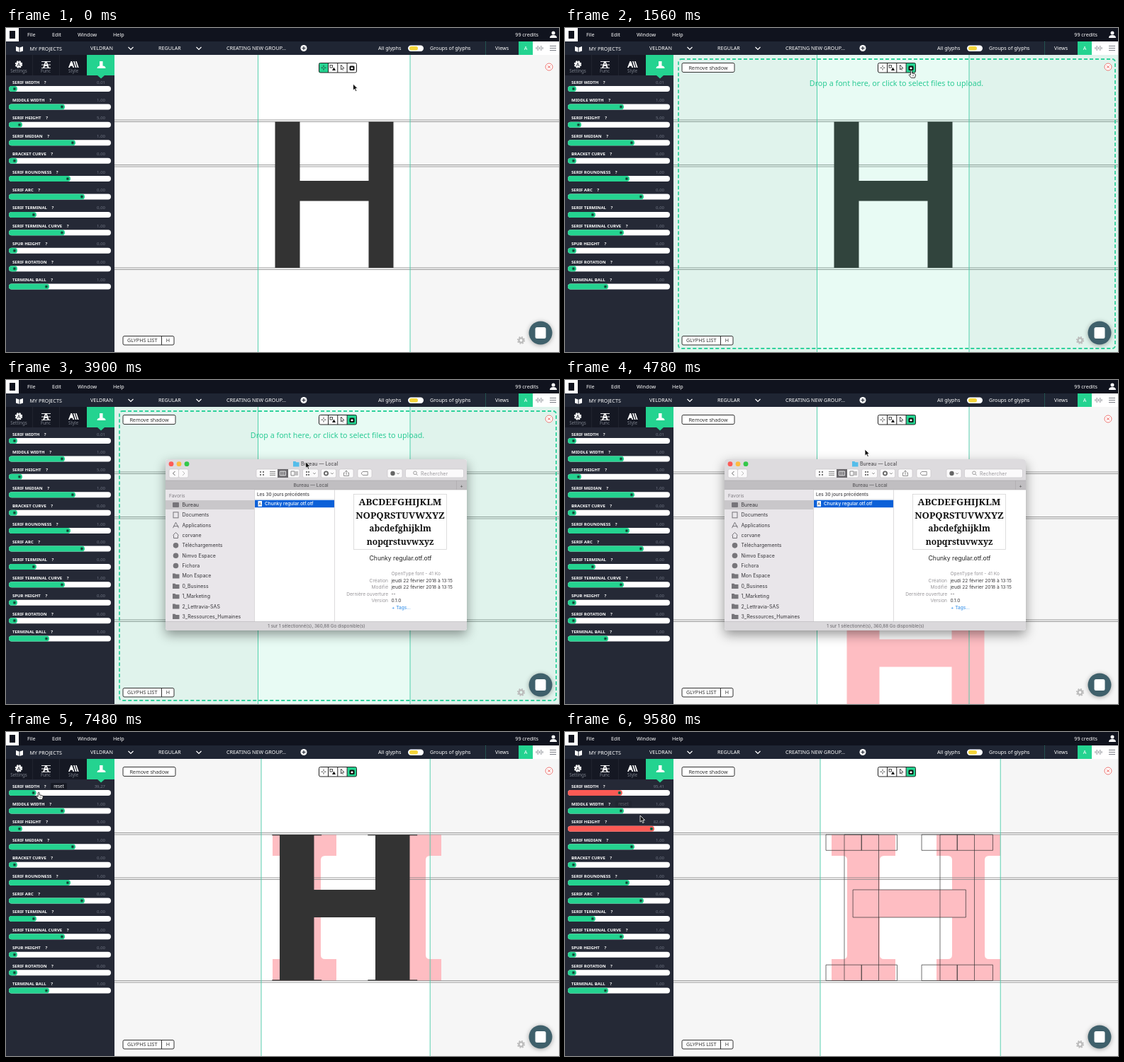
Write an HTML page that moves like this. It is 780 by 458 pixels and loops after 9600 ms.

```html
<!DOCTYPE html>
<html lang="en">
<head>
<meta charset="utf-8">
<title>Glyph editor</title>
<style>
html, body { margin: 0; width: 100%; height: 100%; overflow: hidden; background: #f6f6f6 }
svg { display: block; width: 780px; height: 458px }
text { font: 7.2px "Noto Sans", "Open Sans", sans-serif; white-space: pre }
.label { font-size: 6px; font-weight: 600 }
.finder text { font: 7px Inter, Roboto, sans-serif }
.finder .slab { font: 900 13.2px "Noto Serif", serif }
.finder .slab.low { font-size: 12px }
#finder { filter: drop-shadow(0 6px 8px #0006) }
</style>
</head>
<body>
<svg id="stage" viewBox="0 0 780 458"></svg>
<script>
const LOOP = 9600, GREEN = '#24d390', DARK = '#333';
const box = (x, y, w, h, fill, more = '') =>
  `<rect x="${x}" y="${y}" width="${w}" height="${h}" fill="${fill}" ${more}/>`;
const disc = (x, y, r, fill, more = '') =>
  `<circle cx="${x}" cy="${y}" r="${r}" fill="${fill}" ${more}/>`;
const line = (d, stroke, width = 1, more = '') =>
  `<path d="${d}" fill="none" stroke="${stroke}" stroke-width="${width}" ${more}/>`;
const shape = (d, fill, more = '') => `<path d="${d}" fill="${fill}" ${more}/>`;
const text = (x, y, s, fill = '#fff', more = '') =>
  `<text x="${x}" y="${y}" fill="${fill}" ${more}>${s}</text>`;
const group = (id, body, more = '') => `<g id="${id}" ${more}>${body}</g>`;
const middle = 'text-anchor="middle"', end = 'text-anchor="end"';

// Sliders: name, shown value, knob position
const SLIDERS = [
  ['SERIF WIDTH', '0,01', 12], ['MIDDLE WIDTH', '1,00', 79], ['SERIF HEIGHT', '5,00', 19],
  ['SERIF MEDIAN', '1,00', 94], ['BRACKET CURVE', '0,00', 12], ['SERIF ROUNDNESS', '1,00', 87],
  ['SERIF ARC', '0,00', 107], ['SERIF TERMINAL', '0,00', 39], ['SERIF TERMINAL CURVE', '1,00', 79],
  ['SPUR HEIGHT', '0,00', 12], ['SERIF ROTATION', '0,00', 12], ['TERMINAL BALL', '1,00', 57]
];
const rowY = i => 86 + i * 25.42;

function slider([name, value, knob], i) {
  const y = rowY(i);
  return text(9, y - 7.5, `${name}<tspan dx="6.5">?</tspan>`, '#fff', 'class="label"') +
    text(140, y - 7.5, value, '#717684', `id="value${i}" ${end} style="font-size:6px"`) +
    box(4, y - 4, 144, 8, '#fff', 'rx="4"') +
    box(4, y - 4, knob, 8, GREEN, `id="fill${i}" rx="4"`) +
    `<g id="knob${i}" transform="translate(${knob} ${y})">` +
    disc(0, 0, 2.2, '#167a58') + shape('M-.8 -1.4L1.3 0L-.8 1.4Z', '#11251f') + '</g>';
}

function header() {
  const menus = [[30, 'File'], [65, 'Edit'], [101, 'Window'], [151, 'Help']];
  const chevron = x => line(`M${x - 3.5} 27l3.5 3.5l3.5-3.5`, '#fff', 1.2);
  return box(0, 0, 780, 19, '#10131e') + box(0, 0, 18, 19, '#fff') + box(5, 4, 8, 11, '#10131e') +
    menus.map(([x, s]) => text(x, 12, s)).join('') + text(751, 12, '99 credits', '#fff', end) +
    disc(772, 7, 2.5, '#fff') + shape('M767 14q0-4 5-4t5 4z', '#fff') +
    box(0, 19, 780, 19, '#1f2533') +
    group('navHover', shape('M106 19H192L197 28.5L192 38H106L111 28.5Z', '#213a40')) +
    shape('M14 26l4.5 1.5v6.5l-4.5-1.5zM19.5 27.5l4.5-1.5v6.5l-4.5 1.5z', '#fff') +
    text(33.5, 31.5, 'MY PROJECTS') + text(119, 31, 'VELDRAN') + chevron(176) +
    text(215, 31, 'REGULAR') + chevron(272) + text(311, 31, 'CREATING NEW GROUP...') +
    disc(420, 28.5, 4.5, '#fff') + line('M417.5 28.5h5m-2.5-2.5v5', '#1f2533', 1.2) +
    text(525, 31, 'All glyphs', '#fff', 'font-weight="600"') +
    box(567, 24.5, 22, 8.5, '#fff', 'rx="4.2"') + box(569, 26, 12, 5.5, '#f5d53a', 'rx="2.7"') +
    text(598, 31, 'Groups of glyphs') + line('M676.5 19v19', '#287e6c', 1, 'stroke-dasharray="1 1"') +
    text(690, 31, 'Views') + box(723, 19, 20, 19, GREEN) + box(743, 19, 37, 19, '#fff') +
    text(733, 31.2, 'A', '#fff', `${middle} font-weight="700"`) +
    line('M748 27v3m2.2-5v7m2.3-5v3m2.3-5v7m2.2-5v3', '#8b8d94') +
    line('M767 25.5h9m-9 3h9m-9 3h9', '#777a82', 1.2);
}

function sidebar() {
  const label = (x, s) => text(x, 62.5, s, '#7b808c', `${middle} style="font-size:6.2px"`);
  return box(0, 38, 153, 420, '#252936') + box(0, 38, 153, 29, '#151823') +
    line('M37.5 38v29m38-29v29', '#20232e') +
    group('tabHover', box(76, 38, 38, 29, '#1d2733')) +
    disc(18, 51.5, 4, '#fff', 'stroke="#fff" stroke-width="2.5" stroke-dasharray="2 1.15"') +
    text(18, 54, 'A', '#151823', `${middle} font-weight="800"`) + label(18, 'Settings') +
    text(56.5, 56, 'A', '#fff', `${middle} style="font-size:12px;font-weight:700"`) +
    line('M50 47.5h13m-13 4.5h13m-13 4.5h13', '#fff', .9) + label(56, 'Func') +
    shape('M88 56l3.5-9h1.7l3 9h-1.8l-.7-2.2h-3l-.8 2.2zM95 47h1.6l3 9h-1.8zM98 47h1.6l3 9h-1.8z', '#fff') +
    group('styleLabel', label(95, 'Style')) +
    box(114, 38, 39, 29, GREEN) + shape('M129 67h10l-5 4.5z', GREEN) +
    shape('M132 47h4.5v6.5q4 0 4 3.5h-12q0-3 3.5-3.5z', '#fff') +
    SLIDERS.map(slider).join('') +
    group('reset', box(-2, -6.5, 23, 9, '#171a24', 'rx="1.5"') +
      text(9.5, 0, 'reset', '#fff', `${middle} style="font-size:6.2px"`));
}

function workspace() {
  const guides = [143, 206.5, 352].map(y => `M153 ${y - .5}H790M153 ${y + 2}H790`).join('');
  const stem = 'h90v30h-16q-6 0-6 6v134q0 6 6 6h16v31h-90v-31h16q6 0 6-6v-134q0-6-6-6h-16z';
  return box(153, 38, 627, 420, '#f6f6f6') +
    group('view',
      box(360, 20, 0, 460, '#fff', 'id="page"') +
      shape(`M376 145${stem}M524 145${stem}M443 223h104v39h-104z`, '#febdc2', 'id="shadow"') +
      line(guides, '#858585', .8) + line('', '#48cba6', .9, 'id="edges"') + shape('', DARK, 'id="glyph"')) +
    group('drop', box(153, 38, 627, 420, GREEN, 'fill-opacity=".1"') +
      box(160, 44, 616, 409, 'none', 'rx="4" stroke="#2fd29c" stroke-width="1.8" stroke-dasharray="5 3"') +
      text(467.5, 82, 'Drop a font here, or click to select files to upload.', '#2bcb95',
        `${middle} style="font-size:10.7px"`)) +
    group('remove', box(165, 49.5, 74, 13, '#fff', 'rx="2" stroke="#333"') + text(202, 58.7, 'Remove shadow', DARK, middle)) +
    group('tools', box(441.5, 49.5, 53, 13.5, '#fff', 'rx="2"') + box(441.5, 49.5, 13, 13.5, GREEN, 'id="tool"') +
      box(441.5, 49.5, 53, 13.5, 'none', 'rx="2" stroke="#222"') + line('M454.5 49.5v13.5m13.3-13.5v13.5m13.3-13.5v13.5', '#222') +
      line('M444.5 56.2h7m-3.5-3.5v7', '#222', .8, 'stroke-dasharray="2.6 1.8"') +
      box(457, 52.5, 3.5, 3.5, 'none', 'stroke="#222" stroke-width=".8"') + shape('M460 60l2.5-4.5 2.5 4.5z', '#111') +
      line('M472.5 52v7l1.7-1.5 1.3 2.5M472.5 52l4.5 5h-2.8', '#222', .8) +
      box(484.5, 53.5, 7, 6.5, '#111', 'rx="1.5"') + box(486.5, 55.5, 3, 2.8, '#fff', 'rx="1"')) +
    disc(766, 55, 5, '#fff', 'stroke="#ed6b67" stroke-width=".9"') + line('M764 53l4 4m0-4l-4 4', '#ed6b67', .9) +
    box(165, 435.5, 72, 12.5, '#fff', 'rx="2" stroke="#333"') + line('M219.5 435.5v12.5', DARK) +
    text(171, 444.4, 'GLYPHS LIST', DARK) + text(228.3, 444.4, 'H', DARK, middle) +
    disc(726.5, 441.5, 3.1, 'none', 'stroke="#bbb" stroke-width="2.4"') +
    disc(726.5, 441.5, 4.8, 'none', 'stroke="#bbb" stroke-width="1.6" stroke-dasharray="1.9 1.87"');
}

function finder() {
  const places = ['Bureau', 'Documents', 'Applications', 'corvane', 'Téléchargements', 'Nimvo Espace', 'Fichora',
    'Mon Espace', '0_Business', '1_Marketing', '2_Lettravia-SAS', '3_Ressources_Humaines'];
  const place = (s, i) => {
    const y = 176.5 + i * 14.34, grey = '#77757a';
    const icon = i > 6 ? shape(`M235 ${y - 3.5}h3.5l1 1.2h5v6h-9.5z`, grey)
      : i > 3 ? disc(239.5, y, 3.8, grey)
      : i == 1 ? box(236, y - 4, 7, 8, 'none', `stroke="${grey}"`)
      : i == 2 ? line(`M235.5 ${y + 4}l4-8l4 8m-7.5-2.5h7.5`, grey)
      : i == 3 ? line(`M235.5 ${y}l4-4l4 4m-7 0v4h6v-4`, grey)
      : box(235, y - 3.5, 9, 7, grey, 'rx="1"');
    return icon + text(248.5, y + 2.6, s, '#353438');
  };
  const button = (x, w) => box(x, 126, w, 12, '#fbfafb', 'rx="2" stroke="#c4c2c4" stroke-width=".6"');
  const info = [['Création', 'jeudi 22 février 2018 à 13:15'], ['Modifié', 'jeudi 22 février 2018 à 13:15'],
    ['Dernière ouverture', '--'], ['Version', '0.1.0']];
  const small = 'style="font-size:6.6px"', grey = '#656368';
  return box(225, 112, 425, 242, '#fff', 'rx="4"') +
    shape('M225 142v-26q0-4 4-4h417q4 0 4 4v26z', '#dddbde') + box(225, 142, 425, 13, '#c0bec1') +
    line('M225 142h425m-425 13h425M635.5 142v13', '#a9a7aa', .6) +
    ['#fc5b57', '#fdbc40', '#34c84a'].map((c, i) => disc(233 + i * 11, 118.7, 3.4, c)).join('') +
    shape('M405 115h3.5l1 1.2h4v6.3h-8.5z', '#55bdea') + text(416, 121.2, 'Bureau — Local', '#3d3c3f') +
    text(430, 151.2, 'Bureau — Local', '#4b4a4d', `${middle} ${small}`) + text(642.5, 152, '+', '#555', middle) +
    [[230, 13.5], [243.5, 13.5], [353, 61], [418.5, 22], [444.5, 21], [470, 20], [496, 20], [538, 21], [563.5, 82]]
      .map(b => button(...b)).join('') +
    line('M238.5 129l-3 3 3 3', '#666') + line('M249 129l3 3-3 3', '#bbb') +
    line('M358 130h2m2 0h2m-6 4h2m2 0h2', '#777', 2) + line('M372 129.5h8m-8 2.5h8m-8 2.5h8', '#777', .9) +
    box(383, 126, 15, 12, '#69676b') + line('M386.5 129h8v6h-8zm2.7 0v6m2.7-6v6', '#fff', .8) +
    line('M402 129h5v6h-5zm7 0v6m2-6v6', '#777', .9) +
    line('M423 130h2m1 0h2m-5 4h2m1 0h2', '#777', 2) + disc(451.5, 132, 2.6, 'none', 'stroke="#666" stroke-width="1.8"') +
    [435, 460, 553].map(x => line(`M${x - 1.8} 131.2l1.8 1.8l1.8-1.8`, '#777', .8)).join('') +
    line('M478 131h-1.5v4.5h7V131H482M480 134v-6m-1.7 1.7l1.7-1.7 1.7 1.7', '#777', .8) +
    line('M501 132l2.2-2.5h7v5h-7z', '#777', .8) + disc(545.5, 132, 3.2, '#666') +
    disc(577, 131.3, 2.3, 'none', 'stroke="#888" stroke-width=".8"') + line('M578.7 133l2 2', '#888', .8) +
    text(585, 134.5, 'Rechercher', '#9c9a9e') +
    box(225, 155, 125.5, 187, '#e9e6ea') + box(225, 170, 125.5, 13, '#c9c7ca') +
    text(230, 166, 'Favoris', '#807e83', small) + places.map(place).join('') +
    line('M350.5 155v187m113-187v187', '#d4d2d5', .8) +
    text(354, 164.3, 'Les 30 jours précédents', '#434246', 'style="font-size:6.4px;font-weight:500"') +
    line('M351 168.3h112', '#ddd', .6) + box(351, 169.7, 112, 10.5, '#0b60d8') +
    box(355.5, 171, 5.5, 7.8, '#fff') + text(358.2, 177.2, 'A', '#333', `${middle} style="font-size:5px"`) +
    text(365, 177.4, 'Chunky regular.otf.otf', '#fff', 'style="font-size:6.6px;font-weight:500"') +
    box(490.5, 161.5, 131, 78, '#fff', 'stroke="#cfcfcf" stroke-width=".7"') +
    ['ABCDEFGHIJKLM', 'NOPQRSTUVWXYZ', 'abcdefghijklm', 'nopqrstuvwxyz'].map((s, i) =>
      text(556, 177 + i * 18.6, s, '#111', `${middle} class="slab ${i > 1 ? 'low' : ''}"`)).join('') +
    text(556.5, 254.7, 'Chunky regular.otf.otf', '#222', `${middle} style="font-size:8.6px"`) +
    text(543.5, 276.2, 'OpenType font - 41 Ko', '#98969a', small) +
    info.map(([k, v], i) => text(539, 285.8 + i * 9.5, k, '#98969a', `${end} ${small}`) +
      text(543.5, 285.8 + i * 9.5, v, '#39383b', small)).join('') +
    text(544, 324, '+ Tags...', '#2688e8', small) +
    shape('M225 341.5h425v8.5q0 4-4 4h-417q-4 0-4-4z', '#dad8db') + line('M225 341.5h425', '#b9b7ba', .6) +
    text(438, 350, '1 sur 1 sélectionné(s), 360,88 Go disponible(s)', grey, `${middle} style="font-size:6.3px"`);
}

const stage = document.getElementById('stage');
stage.innerHTML = workspace() + sidebar() + header() + group('finder', finder(), 'class="finder"') +
  disc(754, 431, 16.5, '#3f606b', 'style="filter:drop-shadow(0 1px 3px #0005)"') +
  box(746.5, 423, 15, 16, '#fff', 'rx="2.5"') +
  group('arrow', shape('M0 0V9.2L2.2 7.2L3.7 10.6L5.3 9.8L3.8 6.6H6.6Z', '#111', 'stroke="#fff" stroke-width=".8"')) +
  group('hand', shape('M-1 .8Q0-.8 1 .8V4L5 4.8Q6.3 5.2 6 7L5 10.4H-.3L-3.3 6.4Q-3.2 4.8-1 6.3Z', '#fff',
    'stroke="#111" stroke-width=".8"') + line('M1.6 6v2.5m1.6-2.5v2.5', '#333', .5));

const el = {};
stage.querySelectorAll('[id]').forEach(node => el[node.id] = node);
const set = (id, attrs) => { for (const k in attrs) el[id].setAttribute(k, attrs[k]); };
const show = (id, on) => { el[id].style.display = on ? '' : 'none'; };
const move = (id, x, y) => set(id, { transform: `translate(${x} ${y})` });
const between = (t, a, b) => t >= a && t < b;
const ease = (t, a, b) => { const p = Math.min(1, Math.max(0, (t - a) / (b - a))); return p * p * (3 - 2 * p); };

// Pointer stops: time, x, y
const PATH = [[0, 489.5, 79], [350, 489.5, 79], [900, 488, 60], [1650, 488.5, 60], [2250, 440, 210], [2700, 421, 173],
  [3250, 421, 173], [4200, 423, 98], [4950, 423, 98], [5250, 420, 380], [5850, 420, 236], [6240, 104, 39.5],
  [6340, 95, 50], [6550, 40, 85], [6950, 62, 85], [7180, 20, 85], [7300, 20, 85], [8000, 84, 85],
  [8350, 25, 136], [9150, 128, 136], [9450, 106, 118], [LOOP, 106, 118]];
function pointer(t) {
  const i = PATH.findIndex(p => p[0] > t), [a, x, y] = PATH[i - 1], [b, u, v] = PATH[i];
  const p = ease(t, a, b);
  return [x + (u - x) * p, y + (v - y) * p];
}

function setSlider(i, value, knob, hot) {
  el['value' + i].textContent = value.toFixed(2).replace('.', ',');
  set('fill' + i, { width: knob, fill: hot ? '#fb5a55' : GREEN });
  move('knob' + i, knob, rowY(i));
}

function drawGlyph(bold, width, height, outline) {
  const rect = (x, y, w, h) => `M${x} ${y}h${w}v${h}h${-w}z`;
  const w = 35 + 13.5 * bold, shift = width * .1425, reach = width * .272, tall = height * .27;
  const left = 384 - 3.6 * bold + shift, right = 516 - .6 * bold + shift;
  const edge = 574.5 + 12.5 * bold + 2 * shift;
  let d = rect(left + w / 4, 228.5 - 5.5 * bold, right - left + w / 2, 28.5 + 10.5 * bold);
  for (const x of [left, right]) {
    d += rect(x, 145, w, 206.5);
    if (width > .5) for (const y of [145, 351.5 - tall])
      d += rect(x - reach, y, w / 2 + reach, tall) + rect(x + w / 2, y, w / 2 + reach, tall);
  }
  set('glyph', { d, fill: outline ? 'none' : DARK, stroke: outline ? DARK : 'none', 'stroke-width': .7 });
  set('page', { width: edge - 360 });
  set('edges', { d: `M360 20V480M${edge} 20V480` });
}

function draw(t) {
  const pan = 1 - ease(t, 5250, 5850);
  move('view', -4.5 * pan, -12.5 * pan);
  move('shadow', 4 * pan, 156 * pan);
  show('shadow', t >= 4400);
  show('drop', between(t, 1250, 4400));
  show('remove', t >= 1250);
  show('finder', between(t, 2100, 4950));
  set('tool', { x: t < 1200 ? 441.5 : 481.2 });

  const width = .01 + 95.4 * ease(t, 7180, 8000) * (t < 7180 ? 0 : 1);
  const dragged = ease(t, 7200, 7850);
  const serifWidth = t < 7480 ? .01 + 39.26 * ease(t, 7250, 7480)
    : 39.27 + 56.14 * ease(t, 7480, 8000);
  const serifHeight = 5 + 77.69 * ease(t, 8350, 9150);
  setSlider(0, serifWidth, 12 + .68 * serifWidth, serifWidth > 70);
  setSlider(2, serifHeight, 12.4 + 1.325 * serifHeight, serifHeight > 60);
  drawGlyph(ease(t, 6550, 6950), serifWidth, serifHeight, t >= 9200);

  const row = t < 8200 ? 0 : t < 9230 ? 2 : 1;
  show('reset', between(t, 7180, 8150) || t >= 8300);
  set('reset', { opacity: row == 1 ? .25 : 1 });
  move('reset', row ? 73 : 65, rowY(row) - 7.5);

  show('navHover', between(t, 6140, 6270));
  show('tabHover', between(t, 6200, 6400));
  show('styleLabel', !between(t, 6200, 6400));
  let [x, y] = pointer(t);
  if (between(t, 7250, 8050)) { x = 19.5 + .68 * serifWidth; y = 85; }
  const hand = between(t, 750, 1750) || between(t, 6120, 9250);
  show('hand', hand);
  show('arrow', !hand);
  move(hand ? 'hand' : 'arrow', x, y);
}

const start = performance.now();
(function tick() {
  draw((performance.now() - start) % LOOP);
  requestAnimationFrame(tick);
})();
</script>
</body>
</html>
```
